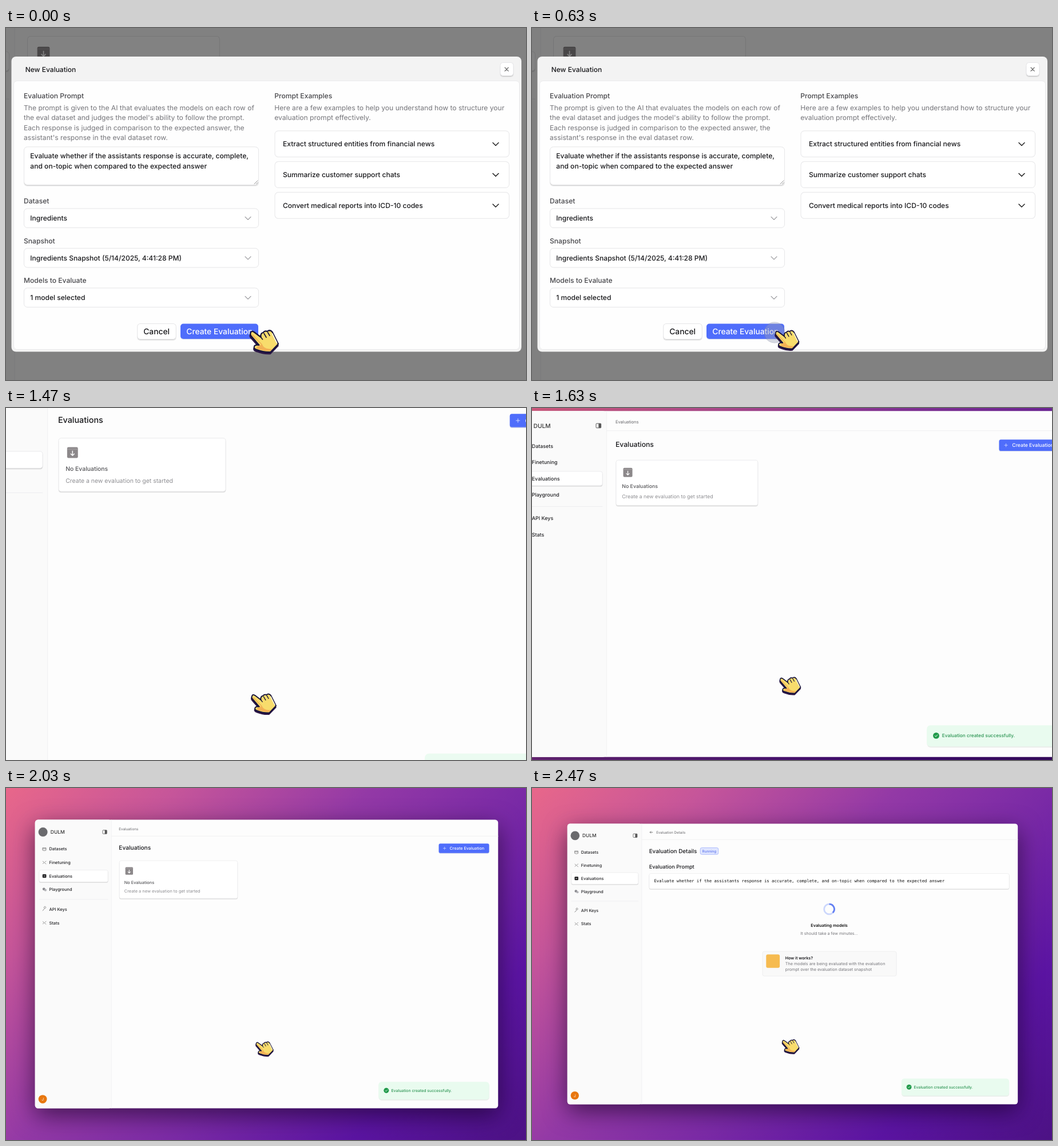
These frames come from a looping animation (909x616 px, 2.51 s). An HTML page:

```html
<!DOCTYPE html>
<html lang="en">
<head>
<meta charset="utf-8">
<title>New evaluation</title>
<style>
  html, body { margin: 0; width: 100%; height: 100%; overflow: hidden; background: #6a1fa5; }
  svg { display: block; width: 100vw; height: 100vh; }
  text { font-family: Inter, "Open Sans", sans-serif; text-rendering: geometricPrecision; white-space: pre; }
  .mono { font-family: "DejaVu Sans Mono", monospace; }
  .mid { text-anchor: middle; }
  .window { filter: drop-shadow(0 12px 20px rgba(20, 0, 30, .62)); }
</style>
</head>
<body>
<svg id="stage" viewBox="0 0 909 616"></svg>
<script>
const LOOP = 2510, CX = 455.5, CY = 308, ZOOM = 1.67, REST = .998;
const BLUE = '#4f6dfb', INK = '#18181b', LABEL = '#46464a', MUTED = '#75757a';

const text = (x, y, str, size, fill = INK, weight = 500, cls = '') =>
  `<text x="${x}" y="${y}" font-size="${size}" fill="${fill}" font-weight="${weight}" class="${cls}">${str}</text>`;
const rect = (x, y, w, h, r, fill, stroke = 'none', sw = 1) =>
  `<rect x="${x}" y="${y}" width="${w}" height="${h}" rx="${r}" fill="${fill}" stroke="${stroke}" stroke-width="${sw}"/>`;
const circle = (x, y, r, fill) => `<circle cx="${x}" cy="${y}" r="${r}" fill="${fill}"/>`;
const line = (d, stroke, sw = 1, fill = 'none') =>
  `<path d="${d}" stroke="${stroke}" stroke-width="${sw}" fill="${fill}" stroke-linecap="round" stroke-linejoin="round"/>`;
// Raised box: soft offset shadow under a thinly outlined rectangle.
const card = (x, y, w, h, r, k = 1, fill = '#fff') =>
  rect(x - k * .5, y + k * 2.4, w + k, h, r, 'rgba(0,0,0,.07)') +
  rect(x, y + k * 1.2, w, h, r, 'rgba(0,0,0,.13)') + rect(x, y, w, h, r, fill, '#e6e6e8', k);
const chevron = (x, y, color, sw) => line(`M${x - 5} ${y - 2.5}l5 5l5 -5`, color, sw);
const group = (id, body, attrs = '') => `<g id="${id}" ${attrs}>${body}</g>`;

function sidebar() {
  const items = [['Datasets', 112.3], ['Finetuning', 135.3], ['Evaluations', 158.3],
                 ['Playground', 181.3], ['API Keys', 214.8], ['Stats', 237.8]];
  const sticks = y => line(`M75.2 ${y - 2}l5.5 4.5M75.2 ${y + 2}l2 -1.6M79 ${y - 1}l1.8 -1.2`, '#777', .7);
  const icons = [
    y => line(`M75.2 ${y - 2}h5.4v4.3q-2.7 1.4 -5.4 0zM75.2 ${y - .4}h5.4`, '#777', .8),
    sticks,
    y => rect(74.7, y - 3, 6.4, 6, 1, '#1b1b1d') + line(`M76.8 ${y}h2.2`, '#fff', .9),
    y => circle(77, y - .8, 2.3, '#8a8a8e') + circle(79.6, y + 1, 2.1, '#b4b4b8'),
    y => line(`M75 ${y + 2.3}l2.8 -2.8`, '#777', .9) + line(`M77.6 ${y - 2}a1.6 1.6 0 1 1 .1 .1z`, '#777', .8),
    sticks];
  return rect(62, 62.5, 130, 491, 5, '#fafafa') + line('M192 63V553', '#f0f0f2', .7) +
    circle(75.5, 83.5, 7.8, '#6b6b6e') + text(88.3, 86.5, 'DULM', 8.3, '#333') +
    rect(177, 80.3, 7, 6.2, .8, '#fff', '#555', .8) + rect(180.5, 80.3, 3.5, 6.2, .5, '#555') +
    card(69, 148.2, 117, 20.3, 3, .6) +
    items.map(([name, y], i) => icons[i](y) + text(86, y + 2.7, name, 7.2, '#222225')).join('') +
    line('M69 198H186', '#ececee', .7) +
    circle(75, 538, 7.2, '#e8770f') + text(75, 540.4, 'J', 6.5, '#fff', 400, 'mid');
}

function listPage() {
  return text(204.5, 80.1, 'Evaluations', 6.1, '#66666a', 400) +
    text(204.5, 113.7, 'Evaluations', 9.9) +
    rect(748.2, 104, 85.5, 16, 2.6, 'rgba(40,60,180,.25)') + rect(748.2, 103.1, 85.5, 16, 2.6, BLUE) +
    line('M755.8 111.1h4.4M758 108.9v4.4', '#cfd8ff', .7) +
    text(766.7, 113.7, 'Create Evaluation', 7, '#fff') +
    card(205.3, 132.3, 201, 64.3, 3, .6) +
    rect(215.5, 143.2, 13, 13, 1.6, '#8c888a') + rect(215.5, 145.2, 13, .7, 0, '#aaa6a8') +
    line('M222 147.8v5.4M219.9 151.2l2.1 2.1l2.1 -2.1', '#fff', 1) +
    text(213.7, 171.8, 'No Evaluations', 7.15, '#565659') +
    text(213.7, 186.3, 'Create a new evaluation to get started', 7.2, '#8e8e92', 400);
}

function detailPage() {
  return line('M211 77.6h-4.6M208.2 75.7l-1.9 1.9l1.9 1.9', '#555', .7) +
    text(217.3, 80, 'Evaluation Details', 6.1, '#66666a', 400) +
    text(204.8, 114, 'Evaluation Details', 9.85) +
    rect(294.3, 104.7, 31.5, 11.6, 2.5, '#e0e6ff', '#9fb0fb', .8) +
    text(310, 112.8, 'Running', 6.3, '#5d75ee', 500, 'mid') +
    text(204.8, 140.7, 'Evaluation Prompt', 9.1) +
    card(205, 149.7, 629, 27, 3, .6) +
    text(213.5, 165.1, 'Evaluate whether if the assistants response is accurate, complete, and on-topic when compared to the expected answer', 7.28, '#111', 400, 'mono') +
    '<circle cx="519.5" cy="212" r="8.9" fill="none" stroke="#ccd7fc" stroke-width="2.8"/>' +
    group('spinner', '<path d="M519.5 203.1a8.9 8.9 0 0 1 6.3 15.2" fill="none" stroke="#6480f2" stroke-width="2.8"/>') +
    text(519.5, 242.8, 'Evaluating models', 7.3, '#111', 600, 'mid') +
    text(519.5, 257.2, 'It should take a few minutes...', 7.15, MUTED, 400, 'mid') +
    rect(403, 286, 234, 43, 3, '#f9f9f9', '#ebebed', .8) +
    rect(409.3, 291.3, 23.8, 23.5, 3, '#f6bb50') +
    text(442.8, 299.6, 'How it works?', 7.1, INK, 600) +
    text(442.8, 310, 'The models are being evaluated with the evaluation', 7.2, MUTED, 400) +
    text(442.8, 320.4, 'prompt over the evaluation dataset snapshot', 7.2, MUTED, 400);
}

function toast() {
  return rect(646, 510, 188, 30, 5, 'rgba(0,60,20,.08)') + rect(645.8, 508.5, 188, 30, 5, '#e9fbef') +
    circle(659, 523.2, 4.4, '#219a4b') + line('M657.2 523.3l1.3 1.3l2.4 -2.6', '#e9fbef', .8) +
    text(667.4, 525.6, 'Evaluation created successfully.', 6.7, '#2b9452');
}

function dialog() {
  const lines = (x, y, rows, color, weight) =>
    rows.map((row, i) => text(x, y + i * 17.4, row, 12.08, color, weight)).join('');
  const fields = [['Dataset', 'Ingredients'],
                  ['Snapshot', 'Ingredients Snapshot (5/14/2025, 4:41:28 PM)'],
                  ['Models to Evaluate', '1 model selected']];
  const examples = ['Extract structured entities from financial news',
                    'Summarize customer support chats', 'Convert medical reports into ICD-10 codes'];
  const cancel = x => card(x, 517.5, 67.5, 27, 5) + text(x + 10.5, 535.8, 'Cancel', 13.8);
  return rect(9.5, 50, 891.5, 516.5, 8, '#f3f3f3') + rect(13.5, 92.5, 884, 470, 6, '#fefefe', '#ebebed') +
    text(33.7, 77, 'New Evaluation', 12) +
    card(864, 60.5, 23, 23, 5) + line('M872 69.2l6.2 6.2M878.2 69.2l-6.2 6.2', '#555', 1.1) +
    text(31, 122.8, 'Evaluation Prompt', 12.1, LABEL) +
    lines(31, 144, ['The prompt is given to the AI that evaluates the models on each row of',
      "the eval dataset and judges the model's ability to follow the prompt.",
      'Each response is judged in comparison to the expected answer, the',
      "assistant's response in the eval dataset row."], MUTED, 400) +
    card(31.5, 208, 410, 66.5, 6) +
    lines(42.3, 228.2, ['Evaluate whether if the assistants response is accurate, complete,',
      'and on-topic when compared to the expected answer'], INK, 500) +
    line('M434 273l6 -6M437.5 273l2.5 -2.5', '#777', .8) +
    fields.map(([label, value], i) => {
      const y = 316 + i * 69.5;
      return text(31, y - 8.6, label, 12.1, LABEL) + rect(31.5, y, 410, 33.5, 6, '#fff', '#e6e6e8') +
        text(42.3, y + 21.3, value, 12.05) + chevron(423, y + 17, '#a0a0a4', 1.1);
    }).join('') +
    text(469.3, 122.8, 'Prompt Examples', 12.1, LABEL) +
    lines(469.3, 144, ['Here are a few examples to help you understand how to structure your',
      'evaluation prompt effectively.'], MUTED, 400) +
    examples.map((label, i) => {
      const y = 180 + i * 53.8;
      return rect(470, y, 409.5, 45.7, 6, '#fff', '#e6e6e8') + text(484, y + 27.3, label, 12.05) +
        chevron(856, y + 23.2, '#222', 1.5);
    }).join('') +
    group('ready', cancel(229.7) + rect(305, 518.5, 136, 26.5, 5, 'rgba(40,60,180,.25)') +
      rect(305, 517.5, 136, 26.5, 5, BLUE) + text(315.3, 535.8, 'Create Evaluation', 13.8, '#fff')) +
    group('busy', cancel(277.2) + rect(352.5, 517.5, 88.5, 26.5, 5, '#a6b4fd') +
      text(362.5, 535.8, 'Creating...', 13.8, '#fff'));
}

function hand() {
  const shape = 'M1 3Q2 -2 7 1L19 10Q18 3 23 2Q26 -2 30 0Q35 -4 39 1L49.5 22L36 36Q25 37 12 32Q5 30 8 25Q11 23 16 24L2 8Q0 6 1 3Z';
  return `<g transform="translate(-.5 3)">${line(shape, '#2a1646', 2.4, '#2a1646')}</g>` +
    line(shape, '#16123a', 2.2, '#f8dc6c') +
    line('M3 6.5L20 23L12 26.5L11 30Q25 35 36 34L39 31L33 30.5Q24 30 21 22L4.5 5Z', 'none', 0, '#f3b155') +
    line('M39 4L47 20', '#fff6d8', 1.8) +
    line('M19 10l3 4M24.5 3.5l4 7M31 1.5l3.5 6', '#16123a', 1.6);
}

const $ = id => document.getElementById(id);
const around = k => `translate(${CX} ${CY}) scale(${k}) translate(${-CX} ${-CY})`;

$('stage').innerHTML =
  `<defs><linearGradient id="sky" gradientUnits="userSpaceOnUse" x1="73" y1="-73" x2="836" y2="689">
    <stop offset="0" stop-color="#e8678a"/><stop offset=".2" stop-color="#c5559a"/>
    <stop offset=".42" stop-color="#9339a6"/><stop offset=".6" stop-color="#7a2aa6"/>
    <stop offset=".8" stop-color="#5b14a2"/><stop offset="1" stop-color="#4c1284"/>
  </linearGradient></defs>` + rect(0, 0, 909, 616, 0, 'url(#sky)') +
  group('world',
    `<g class="window">${rect(62, 62.5, 787, 491, 5, '#fdfdfd')}</g>` +
    group('app', sidebar() + line('M192 90.5H849', '#ededef', .7) +
      group('list', listPage()) + group('detail', detailPage()) + group('toast', toast())) +
    group('modal', rect(62, 62.5, 787, 491, 5, 'rgba(0,0,0,.49)') +
      `<g transform="${around(1 / ZOOM)}">${dialog()}</g>`) +
    `<g transform="${around(1 / ZOOM)}">` +
      '<circle id="ripple" cx="424" cy="533" fill="#9aa0b8" stroke="#7d83a0" stroke-width="1"/>' +
      group('hand', hand()) + '</g>');

const ramp = (t, from, to) => {
  const p = Math.min(1, Math.max(0, (t - from) / (to - from)));
  return p * p * (3 - 2 * p);
};
const show = (id, on) => $(id).style.display = on ? '' : 'none';

function draw(t) {
  // Critically damped spring pulls the camera back.
  const x = Math.max(0, t - 1295) * .0066;
  const scale = REST + (ZOOM - REST) * (1 + x) * Math.exp(-x);
  const blur = 2.2 * x * Math.exp(-x);
  $('world').setAttribute('transform', around(scale));
  $('app').style.filter = blur > .12 ? `blur(${(blur * .6 / scale).toFixed(2)}px)` : '';

  const press = ramp(t, 510, 600) - ramp(t, 680, 800);
  const handX = 426.5 - 1.5 * ramp(t, 0, 500);
  $('hand').setAttribute('transform', `translate(${handX} 531) scale(${1 - .16 * press})`);
  $('ripple').setAttribute('r', 4 + 14 * ramp(t, 530, 630));
  $('ripple').setAttribute('opacity', .4 * (ramp(t, 530, 580) - ramp(t, 650, 790)));

  show('ready', t < 860);
  show('busy', t >= 860);
  const closing = ramp(t, 1260, 1390);
  show('modal', closing < 1);
  $('modal').setAttribute('opacity', 1 - closing);

  const rise = ramp(t, 1370, 1500);
  $('toast').setAttribute('opacity', rise);
  $('toast').setAttribute('transform', `translate(0 ${30 * (1 - rise)})`);

  show('list', t < 2200);
  show('detail', t >= 2200);
  $('spinner').setAttribute('transform', `rotate(${(t - 2470) * .36} 519.5 212)`);
}

function tick() {
  draw(performance.now() % LOOP);
  requestAnimationFrame(tick);
}
tick();
</script>
</body>
</html>
```
